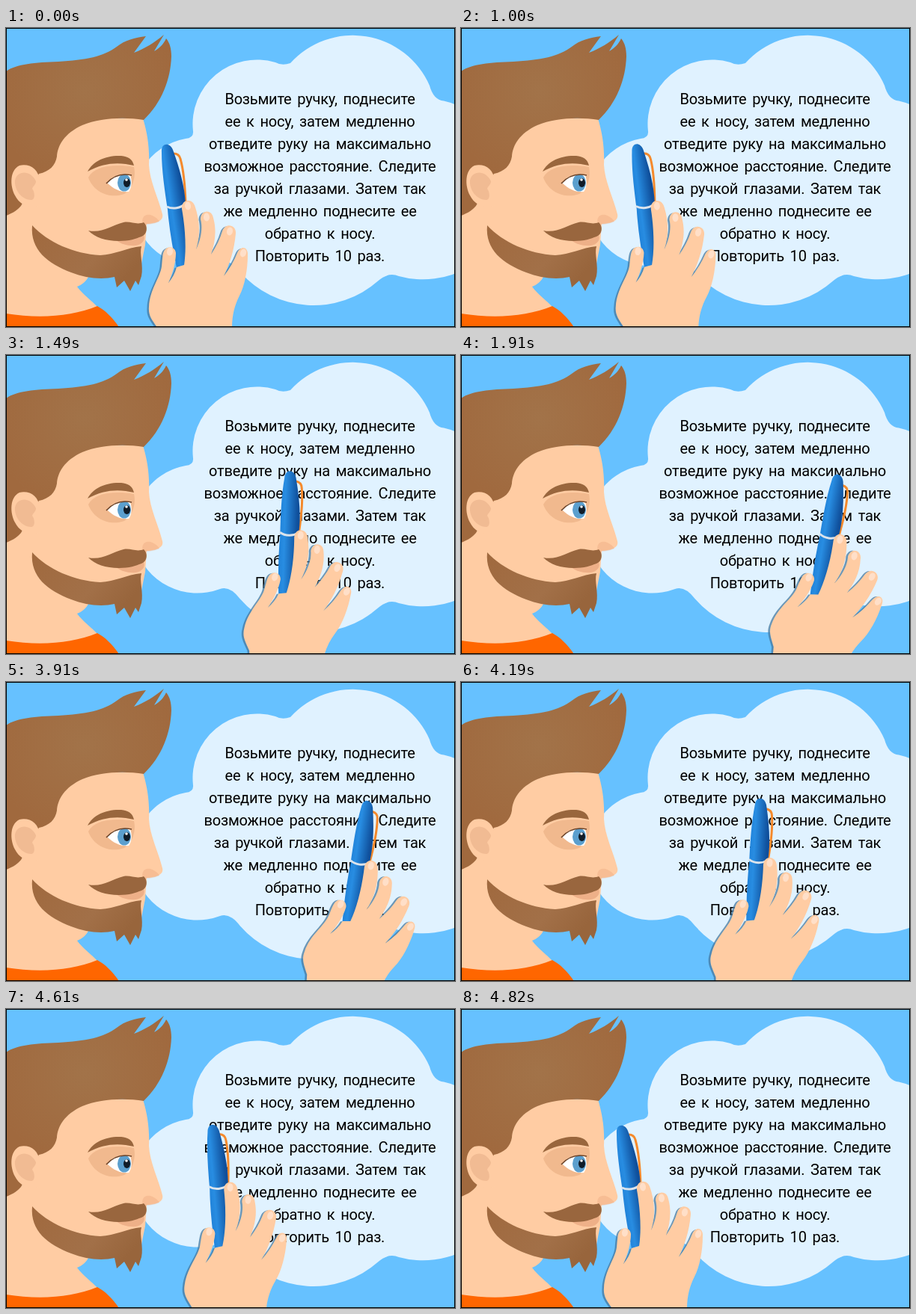
Animation of 600x400 px, one loop 6820 ms. Source, as an HTML page:

```html
<!DOCTYPE html>
<html lang="ru">
<head>
<meta charset="utf-8">
<title>Упражнение для глаз</title>
<style>
  html, body { margin: 0; width: 100%; height: 100%; overflow: hidden; background: #66c1ff; }
  svg { display: block; width: 600px; height: 400px; }
  text { font: 400 20px Roboto, "Open Sans", sans-serif; letter-spacing: -.2px; word-spacing: 3px; text-anchor: middle; }
</style>
</head>
<body>
<svg viewBox="0 0 600 400">
  <defs>
    <radialGradient id="hair" gradientUnits="userSpaceOnUse" cx="105" cy="85" r="125">
      <stop offset="0" stop-color="#a27349"/>
      <stop offset="1" stop-color="#a0693e"/>
    </radialGradient>
    <linearGradient id="beard" x1="0" y1="0" x2="1" y2=".5">
      <stop offset="0" stop-color="#a0693e"/>
      <stop offset=".65" stop-color="#a27048"/>
      <stop offset="1" stop-color="#98653c"/>
    </linearGradient>
    <linearGradient id="barrel" gradientUnits="userSpaceOnUse" x1="212" y1="240" x2="238" y2="236">
      <stop offset="0" stop-color="#1e7fd6"/>
      <stop offset=".35" stop-color="#288de2"/>
      <stop offset="1" stop-color="#0f4f9b"/>
    </linearGradient>
    <path id="palm" d="M212 440 203 402C195 390 190 385 191 373C192 350 206 334 208 319
      C209 310 209 301 212 297C216 291 226 292 227 301C227 315 222 330 217 341
      C222 335 226 328 228 320L238 317C241 298 240 270 235 242C234 228 250 227 253 240
      C259 258 260 277 254 296C261 282 263 266 260 256C260 243 275 242 277 254
      C282 272 279 288 274 303C281 292 286 282 289 272C293 260 308 263 307 275
      C305 297 299 316 291 332C299 322 305 311 309 301C314 290 324 293 323 304
      C323 323 319 345 312 358C305 372 302 385 302 402L306 440Z"/>
  </defs>

  <rect width="600" height="400" fill="#66c1ff"/>
  <path fill="#e0f2ff" d="M240 148Q251 147 250 138A86 86 0 0 1 360 46Q369 51 380 47
    A112 112 0 0 1 566 77Q571 96 585 97.6A121 121 0 1 1 525 332Q511 326 497 338.5
    A130 130 0 0 1 313 326.5Q299 308 286 313A86 86 0 1 1 240 148Z"/>
  <g id="words"></g>

  <g id="man">
    <path fill="#ffcca3" d="M0 140 80 120 183 121C189 141 192 160 191 183C192 205 204 228 209 249
      C211 257 203 261 188 262L186 290 178 330 110 333C107 339 101 344 95 346C103 357 114 364 122 373L110 400H0Z"/>
    <path fill="#ff6600" d="M0 382C45 389 88 386 122 372C133 378 142 387 151 400H0Z"/>
    <path fill="url(#hair)" d="M0 58C14 48 39 46 70 45C106 43 131 38 148 25C159 16 172 13 187 11
      L171 33C185 28 199 19 211 9L198 31C205 27 211 21 214 14C219 20 221 28 221 38C220 69 208 100 184 123
      C158 119 126 120 102 130C78 141 69 157 68 172C66 184 58 192 44 195L20 238C14 245 6 249 0 251Z"/>
    <path fill="#ffcca3" d="M45 205C44 188 31 181 18 184C5 190 5 211 12 224C19 238 34 243 45 237Z"/>
    <path fill="#f1bb93" d="M40 205C33 190 15 190 12 204C11 217 21 230 34 230C39 230 39 220 35 215C36 211 40 210 40 205Z"/>

    <path fill="#f1b98e" d="M110 200C117 186 141 181 171 186C174 199 169 216 158 222C139 229 117 220 110 200Z"/>
    <path fill="#fff" d="M135 207C143 197 154 194 166 197C169 205 168 214 164 219C154 220 144 216 135 207Z"/>
    <ellipse cx="158" cy="207" rx="9" ry="11.5" fill="#5b9fce"/>
    <ellipse cx="161.5" cy="207" rx="4.5" ry="6" fill="#101c28"/>
    <circle cx="161" cy="203" r="1.8" fill="#fff"/>
    <path d="M134 208C143 198 154 194 168 197" fill="none" stroke="#6d4327" stroke-width="1.6"/>
    <path fill="#99663d" d="M109 192C116 178 134 170 154 171C163 172 169 175 171 184C151 179 130 180 109 192Z"/>

    <path fill="#eaa77d" d="M183 263C180 253 186 249 193 250C200 252 204 257 205 259C198 262 190 263 183 263Z" opacity=".4"/>
    <path fill="url(#beard)" d="M35 264C56 287 91 302 126 304C146 303 161 294 181 292C178 302 184 318 181 332
      L177 344 173 338 166 352 158 338 148 347 145 333C128 337 107 335 87 327C56 315 32 297 35 264Z"/>
    <path fill="#eeb088" d="M147 284 184 277C187 284 181 290 173 291C163 292 154 289 147 284Z"/>
    <path fill="#99663e" d="M110 271C128 275 141 264 157 260C167 258 174 264 184 260C190 265 189 276 181 279
      C173 282 165 285 151 285C133 285 119 280 110 271Z"/>
  </g>

  <g id="hand">
    <use href="#palm" x="-2.5" y="1" fill="#45789f" opacity=".75"/>
    <path d="M224 168C229 168 232 171 233 175C237 189 239 205 240 234" fill="none" stroke="#f58a2c" stroke-width="3"/>
    <path fill="url(#barrel)" d="M208 166C207 153 219 153 223 163C232 188 239 212 240 236
      C242 262 241 290 239 318L228 321C223 296 218 268 216 243C212 217 208 190 208 166Z"/>
    <path d="M215 239C223 243 233 241 240 235" fill="none" stroke="#dce4ec" stroke-width="3"/>
    <use href="#palm" fill="#ffcca3"/>
    <g id="nails" fill="#ffdfc8"></g>
  </g>
  <rect x=".5" y=".5" width="599" height="399" fill="none" stroke="#000"/>
</svg>

<script>
const NS = "http://www.w3.org/2000/svg";
const add = (id, tag, attrs, label = "") => {
  const el = document.createElementNS(NS, tag);
  for (const key in attrs) el.setAttribute(key, attrs[key]);
  el.textContent = label;
  document.getElementById(id).append(el);
};

[
  "Возьмите ручку, поднесите",
  "ее к носу, затем медленно",
  "отведите руку на максимально",
  "возможное расстояние. Следите",
  "за ручкой глазами. Затем так",
  "же медленно поднесите ее",
  "обратно к носу.",
  "Повторить 10 раз."
].forEach((line, i) => add("words", "text", { x: 419.5, y: 101.5 + i * 30.1 }, line));

[[219, 299, 8], [243, 238, -5], [268, 253, -3], [299, 272, 14], [317, 301, 18]].forEach(([x, y, turn]) =>
  add("nails", "ellipse", { cx: x, cy: y, rx: 4, ry: 5.5, transform: `rotate(${turn} ${x} ${y})` }));

const LOOP = 6820, STEP = 70, STEPS = 14, AWAY = 1000, BACK = 3910;
const hand = document.getElementById("hand");
const stepsSince = (t, from) => Math.max(0, Math.min(STEPS, Math.floor((t - from) / STEP) + 1));

// The hand slides and tilts by the same amount each step.
function draw(now) {
  const t = now % LOOP;
  const n = stepsSince(t, AWAY) - stepsSince(t, BACK);
  hand.setAttribute("transform", `translate(${n * 15.44} ${n * .264}) rotate(${n * 18 / STEPS} 250 390)`);
}

const start = performance.now();
function tick() {
  draw(performance.now() - start);
  requestAnimationFrame(tick);
}
tick();
</script>
</body>
</html>
```
